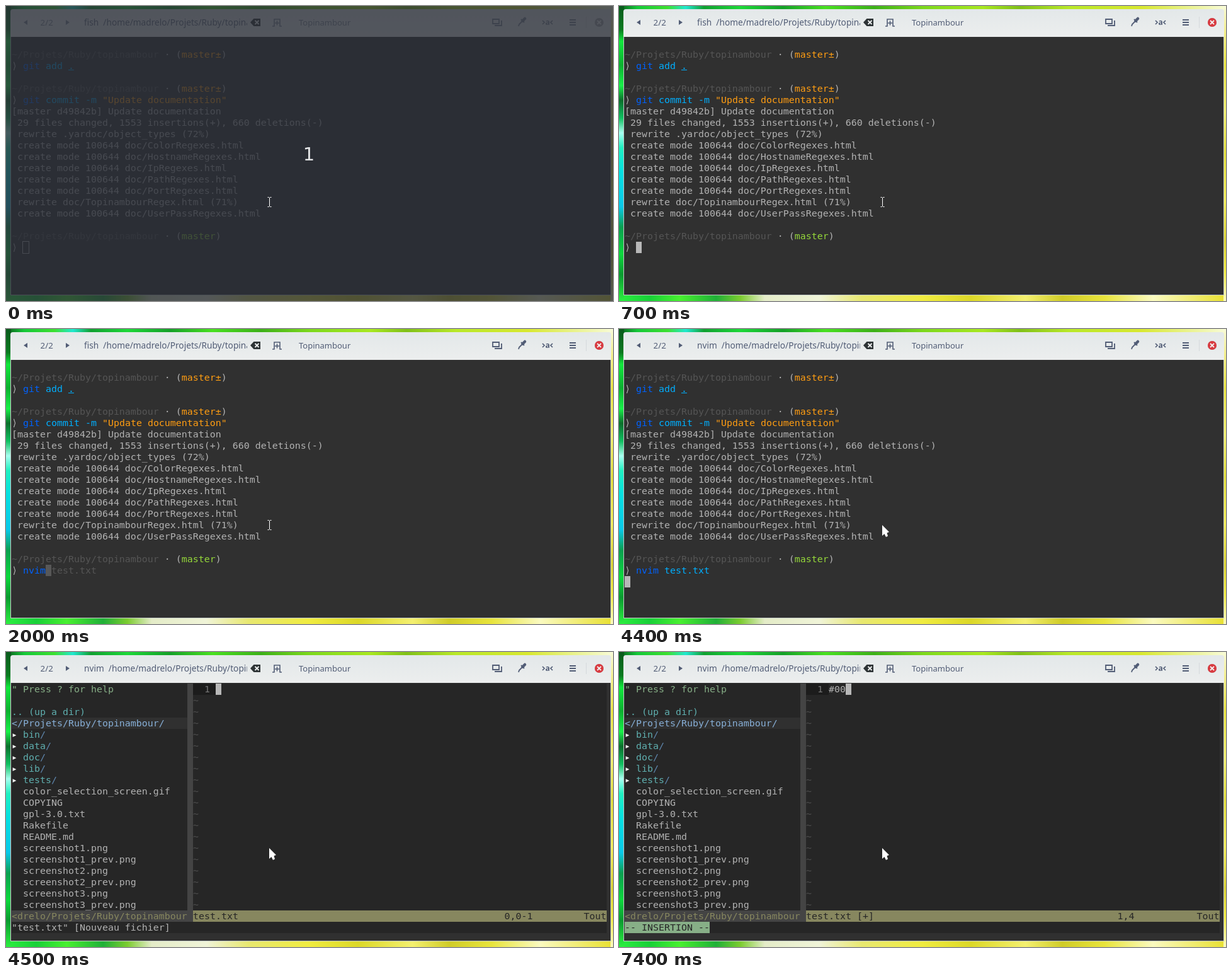
Write an HTML page that moves like this. It is 964 px wide and 468 px high and loops after 8000 ms.

```html
<!DOCTYPE html>
<html lang="en">
<head>
<meta charset="utf-8">
<title>Terminal session</title>
<style>
html, body { margin: 0; width: 100%; height: 100%; overflow: hidden; }
body {
  position: relative;
  background:
    linear-gradient(#0a5a1c, #0a7a20 8%, #12e83c 12%, #0cb030 20%, #18f048 27%, #0b6f2c 32%, #10c060 38%, #a8fff0 43%, #20f0c0 48%, #04e0e0 56%, #08c8e8 68%, #0aa050 75%, #0cd83c 84%, #0a9a30 91%, #2cf040) 0 0/8px 468px no-repeat,
    linear-gradient(#f8fbd8, #f4f090 8%, #e8e23c 20%, #f0ee70 36%, #e0dc38 50%, #f2ec58 66%, #d8d030 80%, #f0ea40 90%, #fafac0) 960px 0/4px 468px no-repeat,
    linear-gradient(90deg, #0a5a1c, #14c838 3%, #3ce030 8%, #20e8d0 11%, #10a030 14%, #1cd838 20%, #14a028 27%, #48e020 34%, #3cb018 42%, #7cd81c 50%, #a8e820 60%, #80c018 66%, #b8e828 74%, #d8e830 86%, #f8fbd8) 0 0/964px 6px no-repeat,
    linear-gradient(90deg, #2cf040, #18d038 5%, #48f030 10%, #20b038 16%, #7ccc30 20%, #e4ecc8 24%, #f0f4d8 33%, #e8e870 40%, #f0ec40 50%, #dcd828 58%, #f4f070 67%, #d0cc28 73%, #e8e43c 80%, #fafac0 88%, #e8e030) 0 458px/964px 10px no-repeat;
}
svg, pre, #term { position: absolute; }
svg { left: 0; top: 0; }
#term {
  left: 7px; top: 49px; width: 952px; height: 409px;
  background: #303030; border: solid #c4ccc8; border-width: 0 1px 1px;
}
/* origin of the character grid: 9 x 18 px cells */
#grid { position: absolute; left: 9px; top: 50px; }
pre {
  margin: 0; top: 0; left: 0; color: #b2b2b2;
  font: 14.95px/18px "DejaVu Sans Mono", monospace;
}
#grid div { position: absolute; }
.dim { color: #555; } .org { color: #ff9d12; } .grn { color: #95d83a; }
.cmd { color: #0062ff; } .arg { color: #00afff; } .err { color: #ff3030; }
.path { text-decoration: underline; }
.cur, .mode { display: inline-block; height: 18px; vertical-align: top; background: #b8b8b8; color: #303030; }
.ghost { background: #585858; }
.hollow { background: none; outline: 1px solid #b2b2b2; }
.help { color: #87af87; } .dir { color: #5fafaf; } .sl { color: #5f87af; }
.root { color: #87afd7; } .tri { color: #eee; } .num { color: #767676; }
.til { color: #4e4e4e; } .stl { color: #87875f; } .str { color: #262626; }
.mode { background: #87af87; color: #262626; }
text { font: 13px "Noto Sans", "Open Sans", sans-serif; white-space: pre; fill: #525d76; }
#count { font: 29px "DejaVu Sans", sans-serif; fill: #e4e5e7; }
</style>
</head>
<body>
<svg width="964" height="468">
  <defs>
    <linearGradient id="bar" x2="0" y2="1"><stop stop-color="#e3e8e9"/><stop offset="1" stop-color="#eceeee"/></linearGradient>
    <clipPath id="clip"><path d="M120 10h263v32h-263z"/></clipPath>
  </defs>
  <path d="M7 49V9q0-4 4-4H957q4 0 4 4V49z" fill="url(#bar)"/>
  <g clip-path="url(#clip)"><text id="tab" x="124" y="31" style="font-size:13.700px"></text></g>
  <path d="M388 26l5.500-6H404V32H393.500z" fill="#2e3436"/>
  <path d="M395.500 23l6 6m0-6l-6 6" stroke="#f0f2f2" stroke-width="1.800"/>
  <g id="tools" fill="none" stroke="#525d76" stroke-width="2">
    <path d="M34 22v8l-6-4zM95 22v8l6-4z" fill="#525d76" stroke="none"/>
    <path d="M423 32h3V21h9v11h3M430.500 23.500v7M427 27h7" stroke-width="1.600"/>
    <path d="M773 21h10v7h-10zM786 24h1v7h-10v-1" stroke-width="1.800"/>
    <path d="M814 32l1-3 5-5M818 21l5 5" stroke-width="1.800"/>
    <path d="M820.500 23.500l3.500-3.500" stroke-width="4.500" stroke-linecap="round"/>
    <path d="M895 22h10M895 26h10M895 30h10"/>
    <path d="M852 23l3 3-3 3M868 23l-3 3 3 3" stroke-width="1.700"/>
    <g stroke="none">
      <text x="54.500" y="31" style="font-size:13.400px">2/2</text>
      <text x="465" y="31">Topinambour</text>
      <text x="860" y="30" text-anchor="middle" style="font-size:12px;font-weight:700">a</text>
    </g>
  </g>
  <path d="M921.500 17v18" stroke="#d5d9dc"/>
  <circle cx="942" cy="26" r="7" fill="#a9adb1"/>
  <circle id="close" cx="942" cy="26" r="7" fill="#d93a40"/>
  <path d="M939 23l6 6m0-6l-6 6" stroke="#f2f2f2" stroke-width="1.800"/>
</svg>
<div id="term"></div>
<div id="grid"></div>
<svg width="964" height="468">
  <g id="shade">
    <path d="M0 0h964v468H0z" fill="#2b2e37" fill-opacity=".79"/>
    <text id="count" x="481" y="244.500" text-anchor="middle">1</text>
  </g>
  <path id="beam" d="M415.500 303.500h2l1 1 1-1h2M418.500 304v14M415.500 318.500h2l1-1 1 1h2" fill="none" stroke="#fff"/>
  <path id="arrow" d="M418 311v17l3.500-3 2.500 5 3-1.500-1.500-5 3.500-1.500z" fill="#fff"/>
</svg>
<script>
const LOOP = 8000;
const $ = id => document.getElementById(id);
const span = (cls, text) => `<span class="${cls}">${text}</span>`;
// the parser drops the first newline inside <pre>, so one is added
const pre = (col, lines) => `<pre style="left:${col * 9}px">\n${lines.join("\n")}</pre>`;
const box = (col, row, w, h, color) =>
  `<div style="left:${col * 9}px;top:${row * 18}px;width:${w * 9}px;height:${h * 18}px;background:${color}"></div>`;

const prompt = branch => span("dim", "~/Projets/Ruby/topinambour") + ` · (${branch})`;
const dirty = prompt(span("org", "master±"));
const create = name => ` create mode 100644 doc/${name}.html`;
const history = [
  "", dirty,
  `⟩ ${span("cmd", "git")} ${span("arg", "add")} ${span("arg path", ".")}`,
  "", dirty,
  `⟩ ${span("cmd", "git")} ${span("arg", "commit -m")} ${span("org", '"Update documentation"')}`,
  "[master d49842b] Update documentation",
  " 29 files changed, 1553 insertions(+), 660 deletions(-)",
  " rewrite .yardoc/object_types (72%)",
  ...["ColorRegexes", "HostnameRegexes", "IpRegexes", "PathRegexes", "PortRegexes"].map(create),
  " rewrite doc/TopinambourRegex.html (71%)",
  create("UserPassRegexes"),
  "", prompt(span("grn", "master"))
];

const command = "nvim test.txt";
const keys = [[3600, 13], [3200, 6], [2000, 4], [1500, 2], [0, 0]];

function shell(t) {
  const n = keys.find(k => t >= k[0])[1];
  const entered = t >= 4300;
  const word = span(n < 4 ? "err" : "cmd", command.slice(0, Math.min(n, 4)));
  const rest = span(n == 6 ? "arg path" : "arg", command.slice(5, Math.max(n, 5)));
  let line = "⟩ " + word + (n > 4 ? " " + rest : "");
  if (entered) line += "\n" + span("cur", " ");
  else if (n && n < 13) line += span("cur ghost", command[n]) + span("dim", command.slice(n + 1));
  else line += span(t < 400 ? "cur hollow" : "cur", " ");
  return pre(0, [...history, line]);
}

const tree = [
  span("help", '" Press ? for help'), "",
  span("dir", ".. (up a dir)"),
  span("root", "&lt;/Projets/Ruby/topinambour/"),
  ...["bin", "data", "doc", "lib", "tests"].map(d => span("tri", "▸ ") + span("dir", d) + span("sl", "/")),
  ...["color_selection_screen.gif", "COPYING", "gpl-3.0.txt", "Rakefile", "README.md",
    "screenshot1.png", "screenshot1_prev.png", "screenshot2.png", "screenshot2_prev.png",
    "screenshot3.png", "screenshot3_prev.png"].map(f => "  " + f),
  span("stl", "&lt;drelo/Projets/Ruby/topinambour")
];

function editor(t) {
  const text = t < 6300 ? "" : t < 7400 ? "#" : "#00";
  const file = text ? "test.txt [+]" : "test.txt";
  const pos = text ? "1," + (text.length + 1) : "0,0-1";
  const message = text ? span("mode", "-- INSERTION --") : '"test.txt" [Nouveau fichier]';
  return box(0, 0, 105, 22, "#262626") + box(0, 3, 31, 1, "#303030") +
    box(31, 0, 1, 21, "#444") + box(0, 20, 31, 1, "#444") +
    box(32, 0, 4, 1, "#1c1c1c") + box(32, 20, 73, 1, "#87875f") +
    pre(0, [...tree, message]) +
    pre(32, [
      span("num", "  1 ") + text + span("cur", " "),
      ...Array(19).fill(span("til", "~")),
      span("str", file.padEnd(55) + pos.padEnd(14) + "Tout")
    ]);
}

let shown = "";
function draw(now) {
  const t = now % LOOP;
  const html = t < 4500 ? shell(t) : editor(t);
  if (html !== shown) $("grid").innerHTML = shown = html;
  // window regains focus in 100 ms steps
  const focus = Math.min(1, Math.max(0, Math.floor((t - 400) / 100) / 3));
  $("tools").style.opacity = 0.65 + 0.35 * focus;
  $("tab").style.opacity = 0.85 + 0.15 * focus;
  $("close").style.opacity = focus;
  $("shade").style.display = t < 400 ? "" : "none";
  const busy = t >= 4400;
  $("tab").textContent = (busy ? "nvim" : "fish") + "  /home/madrelo/Projets/Ruby/topinambour";
  $("beam").style.display = busy ? "none" : "";
  $("arrow").style.display = busy ? "" : "none";
}

const start = performance.now();
function tick() {
  draw(performance.now() - start);
  requestAnimationFrame(tick);
}
tick();
</script>
</body>
</html>
```
